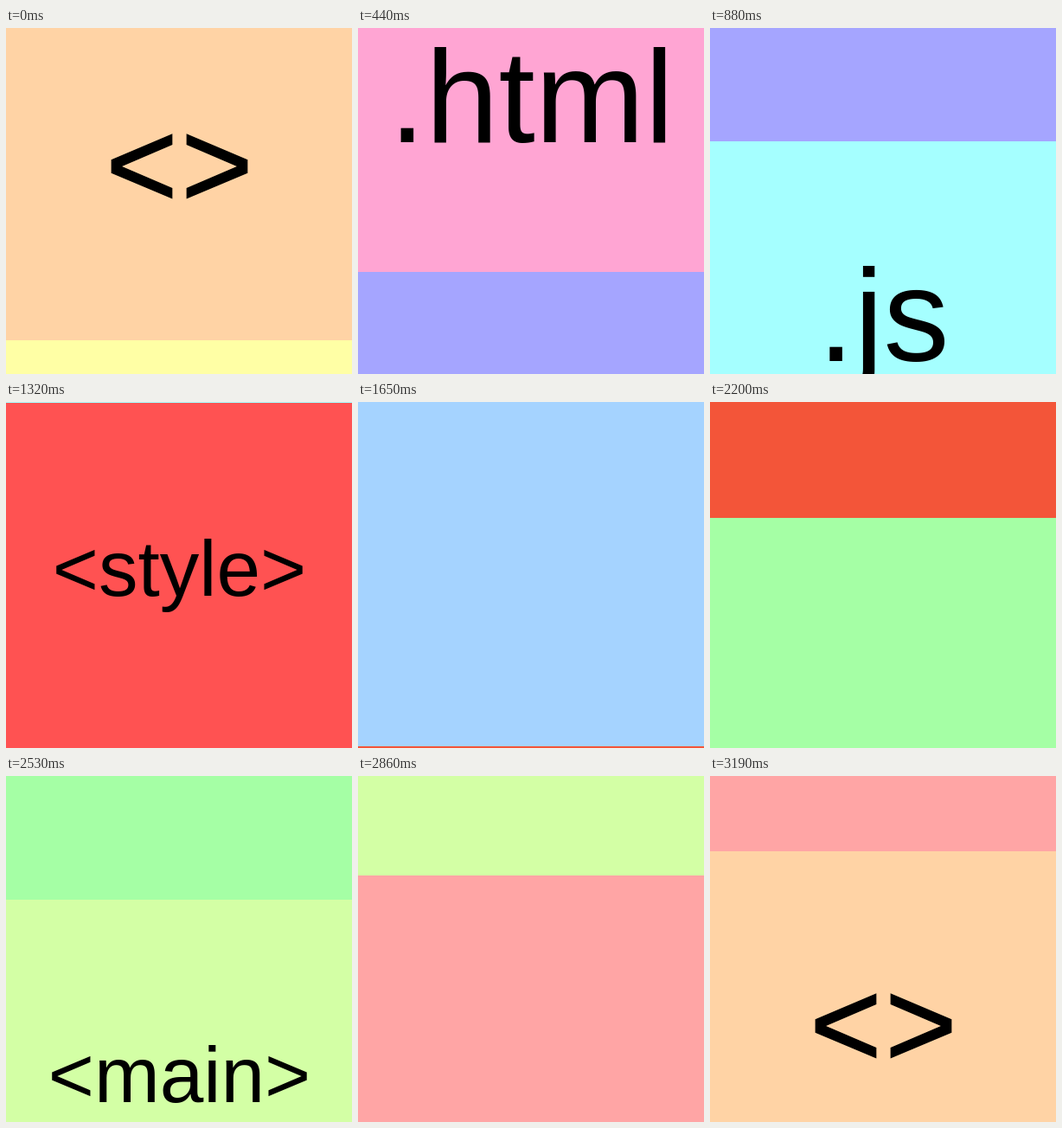
Write an HTML page with a canvas that moves like this. It is 400x400 px and loops after 3300 ms.

```html
<!DOCTYPE html>
<html lang="en">
<head>
<meta charset="utf-8">
<title>Scrolling slides</title>
<style>
  html, body { margin: 0; width: 100%; height: 100%; overflow: hidden; }
  canvas { display: block; width: 400px; height: 400px; }
</style>
</head>
<body>
<canvas id="stage" width="400" height="400"></canvas>
<script>
const ctx = document.getElementById('stage').getContext('2d');
const SIZE = 400, HEIGHT = 403, STEP = 110, LOOP = 3300;
const SANS = '"Liberation Sans", Arial, sans-serif';
const SERIF = '"Liberation Serif", "Times New Roman", serif';

// baseline is measured from the top of the slide
const slides = [
  { back: '#ffd3a5', text: '<>', font: `142px ${SANS}`, baseline: 248.5, spacing: 4, outline: 1.7 },
  { back: '#ffffa5' },
  { back: '#ffa5d3', text: '.html', font: `152px ${SANS}`, baseline: 253 },
  { back: '#a5a5ff' },
  { back: '#a5ffff', text: '.js', font: `152px ${SANS}`, baseline: 254 },
  { back: '#ff5252', text: '<style>', font: `91px ${SANS}`, baseline: 223 },
  { back: '#a5d3ff' },
  { back: '#f35539', text: 'Yovu', font: `bold 122px ${SERIF}`, baseline: 231, color: '#fff' },
  { back: '#a5ffa5' },
  { back: '#d3ffa5', text: '<main>', font: `91px ${SANS}`, baseline: 234 },
  { back: '#ffa5a5' },
];

// [step, scroll offset], linear in between
const path = [[0, 42], [4, 927], [8, 1481], [12, 2014], [17, 2696], [23, 3484], [29, 4346], [30, 4475]];

function scrollAt(step) {
  const i = path.findIndex(([s]) => s > step);
  const [s0, y0] = path[i - 1], [s1, y1] = path[i];
  return Math.round(y0 + (y1 - y0) * (step - s0) / (s1 - s0));
}

function drawSlide({ back, text, font, baseline, color = '#000', spacing = 0, outline = 0 }, top) {
  ctx.fillStyle = back;
  ctx.fillRect(0, top, SIZE, HEIGHT);
  if (!text) return;
  ctx.fillStyle = ctx.strokeStyle = color;
  ctx.font = font;
  ctx.letterSpacing = `${spacing}px`;
  ctx.textAlign = 'center';
  const x = 200.5 + spacing / 2, y = top + baseline;
  ctx.fillText(text, x, y);
  if (outline) {
    ctx.lineWidth = outline;
    ctx.strokeText(text, x, y);
  }
}

function draw(now) {
  const scroll = scrollAt(Math.floor(now % LOOP / STEP));
  const first = Math.floor(scroll / HEIGHT);
  for (const i of [first, first + 1]) {
    drawSlide(slides[i % slides.length], i * HEIGHT - scroll);
  }
}

const start = performance.now();
function tick() {
  draw(performance.now() - start);
  requestAnimationFrame(tick);
}
tick();
</script>
</body>
</html>
```
